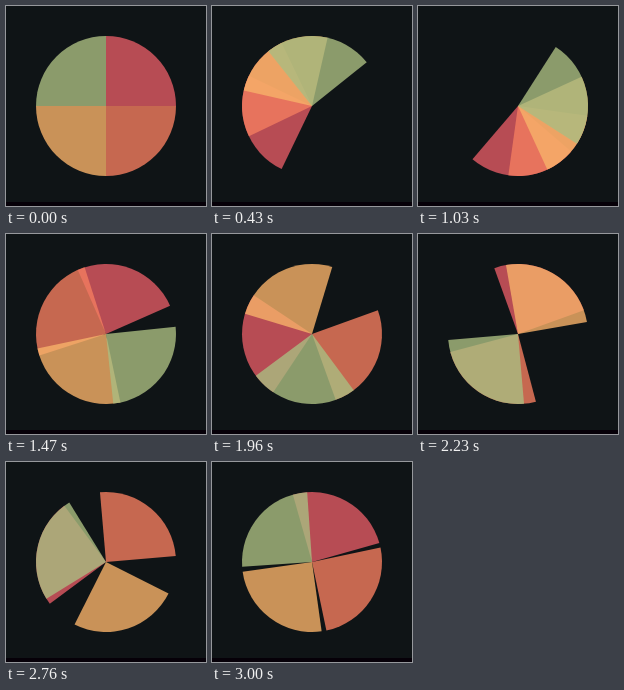
Write an HTML page that moves like this. It is 200 by 200 pixels and loops after 3030 ms.

```html
<!DOCTYPE html>
<html lang="en">
<head>
<meta charset="utf-8">
<title>Wedges</title>
<style>
  html, body { margin: 0; width: 100%; height: 100%; overflow: hidden; background: #0f1416; }
  svg { display: block; width: 200px; height: 200px; }
  path { fill-opacity: .8; }
</style>
</head>
<body>
<svg viewBox="0 0 200 200">
  <rect width="200" height="200" fill="#0f1416"/>
  <rect y="196" width="200" height="4" fill="#060008"/>
  <g id="wedges" transform="translate(100 100)">
    <path d="M0 0V-70A70 70 0 0 1 70 0Z" fill="#e15b64"/>
    <path d="M0 0V-70A70 70 0 0 1 70 0Z" fill="#f47e60"/>
    <path d="M0 0V-70A70 70 0 0 1 70 0Z" fill="#f8b26a"/>
    <path d="M0 0V-70A70 70 0 0 1 70 0Z" fill="#abbd81"/>
  </g>
</svg>
<script>
  const LOOP = 3030, STEPS = 91;
  const wedges = [...document.querySelectorAll('#wedges path')];

  function draw() {
    // Motion advances in 91 hard steps, on a 10 ms clock.
    const time = Math.floor(performance.now() % LOOP / 10) * 10;
    const phase = Math.floor((time + 5) * STEPS / LOOP) / STEPS;
    wedges.forEach((wedge, i) => {
      const turns = 4 - i; // the first wedge is the fastest
      wedge.setAttribute('transform', `rotate(${90 * i + 360 * turns * phase})`);
    });
    requestAnimationFrame(draw);
  }
  draw();
</script>
</body>
</html>
```
